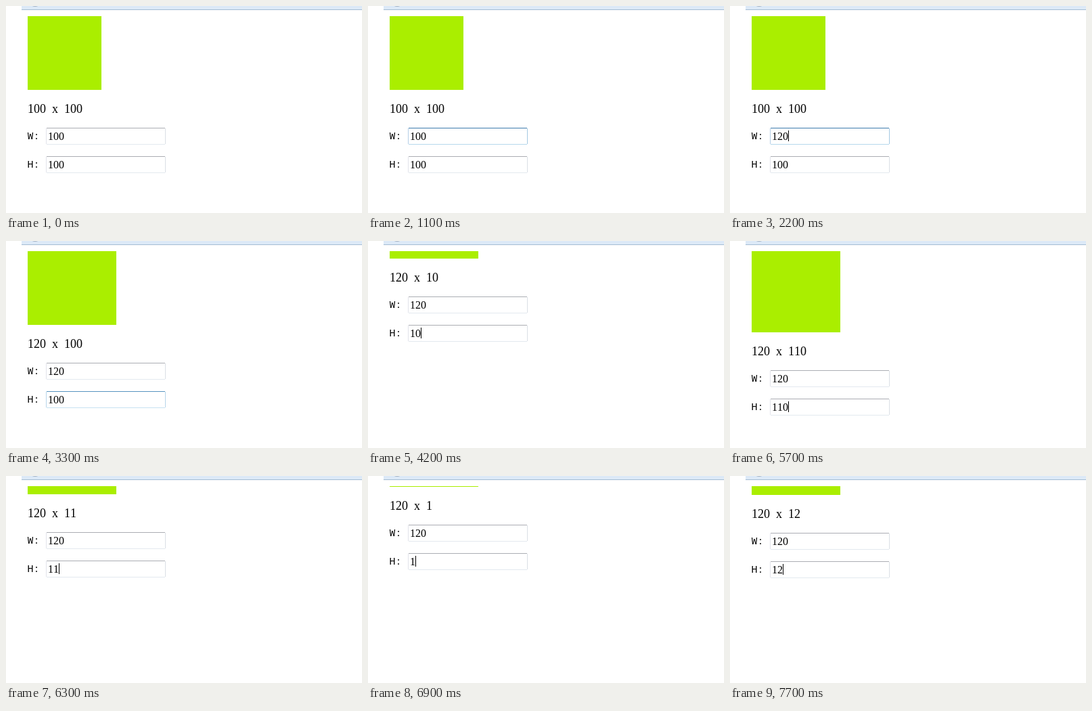
An HTML page for the animation above (8 s loop, 526 by 306 pixels).

```html
<!DOCTYPE html>
<html lang="en">
<head>
<meta charset="utf-8">
<title>Resizable box</title>
<style>
  html, body { margin: 0; width: 526px; height: 306px; overflow: hidden; background: #fff; }
  svg { display: block; }
  rect { shape-rendering: crispEdges; }
  text { font: 18px "Liberation Serif", "Times New Roman", serif; font-kerning: none; white-space: pre; }
  #size { word-spacing: 4.5px; }
  .label { font: 15px "Noto Sans Mono", "Liberation Mono", monospace; }
  .value { font-size: 16px; }
</style>
</head>
<body>
<svg id="stage" width="526" height="306" viewBox="0 0 526 306">
  <rect x="23" width="503" height="5" fill="#dce9f7"/>
  <rect x="23" y="5" width="503" height="1" fill="#a5bdd3"/>
  <ellipse cx="43" cy="-2" rx="6" ry="3" fill="#a3b2c3"/>
  <rect id="box" x="32" y="15" fill="#ae0"/>
  <g id="form"><text id="size" x="32" y="158"></text></g>
</svg>
<script>
const LOOP = 8000, TICK = 100, SCALE = 1.09, BASE = 109;

// start, W value, H value, field with caret, applied width, applied height
const STEPS = [
  [0, "100", "100", "", 100, 100],
  [700, "100", "100", "W", 100, 100],
  [1100, "100", "100", "", 100, 100],
  [1300, "10", "100", "W", 100, 100],
  [1500, "1", "100", "W", 100, 100],
  [1800, "12", "100", "W", 100, 100],
  [2200, "120", "100", "W", 100, 100],
  [2700, "120", "100", "", 100, 100],
  [2900, "120", "100", "", 120, 100],
  [3500, "120", "100", "H", 120, 100],
  [4000, "120", "100", "", 120, 100],
  [4200, "120", "10", "H", 120, 10],
  [4400, "120", "1", "H", 120, 1],
  [4900, "120", "1", "", 120, 1],
  [5400, "120", "11", "H", 120, 11],
  [5700, "120", "110", "H", 120, 110],
  [6200, "120", "110", "", 120, 110],
  [6300, "120", "11", "H", 120, 11],
  [6800, "120", "11", "", 120, 11],
  [6900, "120", "1", "H", 120, 1],
  [7400, "120", "1", "", 120, 1],
  [7700, "120", "12", "H", 120, 12]
];

// Border colours: top, left, right, bottom
const LOOKS = {
  idle: [[171, 173, 179], [226, 227, 234], [219, 223, 230], [227, 233, 239]],
  hover: [[87, 148, 191], [183, 213, 234], [183, 213, 234], [199, 226, 241]],
  focus: [[61, 123, 173], [181, 207, 231], [164, 201, 227], [183, 217, 237]]
};

// Fade start, fade end, look reached
const FADES = {
  W: [[0, 0, "idle"], [400, 400, "hover"], [600, 800, "focus"], [2800, 3200, "idle"]],
  H: [[0, 0, "idle"], [3100, 3300, "hover"], [3400, 3600, "focus"], [4200, 4200, "idle"]]
};

const $ = id => document.getElementById(id);
const lastBefore = (list, t) => list.findLastIndex(item => item[0] <= t);

function add(tag, attrs, text = "") {
  const el = document.createElementNS("http://www.w3.org/2000/svg", tag);
  for (const key in attrs) el.setAttribute(key, attrs[key]);
  el.textContent = text;
  return $("form").appendChild(el);
}

function makeField(name, y) {
  add("text", { class: "label", x: 31.5, y: y + 17 }, name + ":");
  const edges = [
    [60, y, 175, 1], [59, y + 1, 1, 23], [235, y + 1, 1, 23], [60, y + 24, 175, 1]
  ].map(([x, top, width, height]) => add("rect", { x, y: top, width, height }));
  return {
    edges,
    value: add("text", { class: "value", x: 62, y: y + 18 }),
    caret: add("rect", { y: y + 4, width: 1, height: 16 })
  };
}

const fields = { W: makeField("W", 180), H: makeField("H", 222) };

function borderAt(name, t) {
  const fades = FADES[name], i = lastBefore(fades, t);
  const [start, end, look] = fades[i];
  const from = LOOKS[i ? fades[i - 1][2] : look], to = LOOKS[look];
  const k = end > start ? Math.min(1, (t - start) / (end - start)) : 1;
  return to.map((color, e) =>
    `rgb(${color.map((c, n) => Math.round(from[e][n] + (c - from[e][n]) * k))})`);
}

function drawField(name, value, active, t) {
  const { edges, value: label, caret } = fields[name];
  label.textContent = value;
  caret.setAttribute("x", 62 + 8 * value.length);
  caret.setAttribute("visibility", active ? "visible" : "hidden");
  borderAt(name, t).forEach((color, i) => edges[i].setAttribute("fill", color));
}

function draw(time) {
  const t = Math.floor((time % LOOP) / TICK) * TICK;
  const [, wText, hText, active, w, h] = STEPS[lastBefore(STEPS, t)];
  const height = Math.round(h * SCALE);
  $("box").setAttribute("width", Math.round(w * SCALE));
  $("box").setAttribute("height", height);
  $("form").setAttribute("transform", `translate(0 ${height - BASE})`);
  $("size").textContent = `${w} x ${h}`;
  drawField("W", wText, active === "W", t);
  drawField("H", hText, active === "H", t);
}

const began = performance.now();
function tick() {
  draw(performance.now() - began);
  requestAnimationFrame(tick);
}
tick();
</script>
</body>
</html>
```
